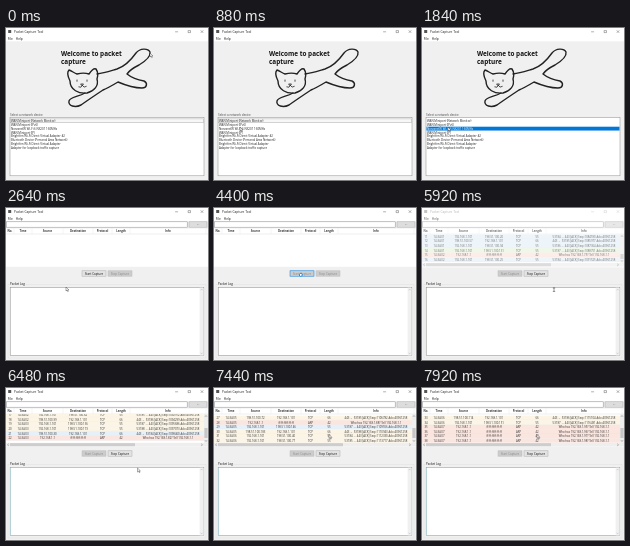
Write an HTML page that moves like this. It is 202x152 px and loops after 8 s.

```html
<!DOCTYPE html>
<html lang="en">
<head>
<meta charset="utf-8">
<title>Packet Capture Tool</title>
<style>
html, body { margin: 0; width: 100%; height: 100%; overflow: hidden; background: #f0f0f0; }
svg { display: block; width: 100vw; height: 100vh; }
text { font-family: "Open Sans", "Noto Sans", sans-serif; white-space: pre; }
</style>
</head>
<body>
<svg id="stage" viewBox="0 0 202 152" preserveAspectRatio="none"></svg>
<script>
const LOOP = 8000, STEP = 80, ROW = 4.6;
const stage = document.getElementById('stage');

const rect = (x, y, w, h, fill, stroke = 'none', sw = .5) =>
  `<rect x="${x}" y="${y}" width="${w}" height="${h}" fill="${fill}" stroke="${stroke}" stroke-width="${sw}"/>`;
const label = (x, y, s, { size = 3.2, fill = '#111', anchor = 'start', weight = 400 } = {}) =>
  `<text x="${x}" y="${y}" font-size="${size}" fill="${fill}" text-anchor="${anchor}" font-weight="${weight}">${s}</text>`;
const line = (d, stroke, sw = .5) =>
  `<path d="${d}" fill="none" stroke="${stroke}" stroke-width="${sw}" stroke-linecap="round" stroke-linejoin="round"/>`;

// Position on a list of [time, x, y] points, eased between neighbours.
function along(points, t) {
  let a = points[0];
  for (const b of points) {
    if (t < b[0]) {
      const p = (t - a[0]) / (b[0] - a[0]), e = p * p * (3 - 2 * p);
      return [a[1] + (b[1] - a[1]) * e, a[2] + (b[2] - a[2]) * e];
    }
    a = b;
  }
  return [a[1], a[2]];
}

const pointer = [
  [0, 144, 25], [480, 62, 104], [720, 30, 112], [880, 26, 99], [2560, 26, 99],
  [2640, 60, 79], [3440, 86, 64.5], [4400, 86, 64.5], [5200, 132, 81],
  [6400, 132, 81], [7200, 115, 46.5]
];

function cursor(t) {
  const [x, y] = along(pointer, t);
  const beam = (t >= 2000 && t < 2640) || (t >= 5280 && t < 6480);
  if (beam) return line(`M${x - .8} ${y - 1}h1.6M${x} ${y - 1}v3.4M${x - .8} ${y + 2.4}h1.6`, '#222', .45);
  const busy = t >= 4400 && t < 5200;
  return (busy ? `<circle cx="${x + .8}" cy="${y + 2.4}" r="1.5" fill="#fff" stroke="#1c86d1" stroke-width=".9"/>` : '') +
    (busy ? '' : `<path d="M${x} ${y}v4l1-.9.7 1.5.6-.3-.7-1.4h1.3z" fill="#fff" stroke="#111" stroke-width=".35"/>`);
}

function frame(t) {
  const ink = t >= 4800 && t < 6000 ? '#999' : '#222';
  return rect(0, 0, 202, 152, '#f0f0f0') + rect(0, 0, 202, 13.3, '#fff') +
    rect(2.2, 2, 3, 3, ink === '#222' ? '#555' : '#aaa') +
    label(8, 4.9, 'Packet Capture Tool', { fill: ink }) +
    line('M169.5 3.8h2.2M182.5 2.6h2v2h-2zM195 2.6l2 2m0-2l-2 2', ink, .35) +
    label(1.8, 11.7, 'File') + label(9.8, 11.7, 'Help');
}

const devices = [
  'WAN Miniport (Network Monitor)', 'WAN Miniport (IPv6)', 'Norvane(R) Wi-Fi 6 NX201 160MHz',
  'WAN Miniport (IP)', 'Brightfen Wi-Fi Direct Virtual Adapter #2',
  'Bluetooth Device (Personal Area Network)', 'Brightfen Wi-Fi Direct Virtual Adapter',
  'Adapter for loopback traffic capture'
];

const cat = line('M91 46C98 45 104 43 111 41C120 38 125 32 130 25C134 20 142 20 144 24C145 29 138 34 133 37' +
    'C127 40 123 43 121 46C126 50 132 52 138 53C142 55 141 60 136 60C128 60 119 57 112 54C107 57 102 60 97 62' +
    'C91 66 82 72 75 77C69 80 62 78 63 73C64 69 72 69 79 65', '#222', 1.4) +
  line('M64 53C61 47 61 44 63 42C66 43 68 45 71 46C75 45 80 45 83 46C85 43 88 40 90 41C92 44 92 48 91 51' +
    'C93 58 88 63 81 65C73 66 64 62 64 53', '#222', 1.4) +
  line('M71 52v1.3M81 52v1.3M75 56h2.5l-1.2 1.4zM76.3 57.5q-1 3-3.5 1.5M76.3 57.5q1.5 3 4 1', '#222', .8);

function deviceScreen(t) {
  const picked = t >= 1840 ? 2 : -1;
  return label(55, 27.8, 'Welcome to packet', { size: 6.4, weight: 700 }) +
    label(55, 36, 'capture', { size: 6.4, weight: 700 }) + cat +
    label(4, 87.6, 'Select a network device', { size: 3, fill: '#444' }) +
    rect(4, 89.5, 194, 58.3, '#fff', '#8c8c8c') +
    (picked < 0 ? rect(4.6, 90.9, 192.8, 3.9, '#f7f7f7', '#999', .4)
      : rect(4.5, 91 + picked * 3.85, 193, 3.85, '#0078d7')) +
    devices.map((s, i) => label(5, 94 + i * 3.85, s, { size: 2.9, fill: i === picked ? '#fff' : '#222' })).join('');
}

const columns = [['No.', 0, 8], ['Time', 8, 18], ['Source', 26, 31], ['Destination', 57, 30],
  ['Protocol', 87, 19], ['Length', 106, 18], ['Info', 124, 76]];
const kinds = 'tttgatyyyytayytyyatyyyyyaaaa';
const tints = { t: '#e5f0f9', g: '#e7f3df', y: '#fcf5e6', a: '#fbe5df' };

function packet(i) {
  const kind = kinds[i], out = i % 3 !== 1;
  const here = '192.168.1.101', there = `198.51.100.${20 + i * 37 % 180}`;
  const time = `14:34:0${Math.min(9, 1 + (i >> 2))}`, port = 53184 + i % 5;
  if (kind === 'a') return [time, '192.168.1.1', 'ff:ff:ff:ff:ff:ff', 'ARP', 42, `Who has 192.168.1.${71 + i}? Tell 192.168.1.1`];
  const ports = out ? `${port} → 443` : `443 → ${port}`;
  return [time, out ? here : there, out ? there : here, 'TCP', out ? 55 : 66,
    `${ports} [ACK] Seq=${1084590 + i * 1387} Ack=40961258`];
}

function packets(t) {
  if (t < 5920) return '';
  const ticks = (from, count) => Math.max(0, Math.min(count, Math.floor((t - from) / STEP) + 1));
  const first = t < 6480 ? 0 : 5 + ticks(6480, 10) + ticks(7440, 7);
  const top = 26.3 + (t < 6480 ? 0 : t < 7440 ? -1.5 : 1.3);
  let rows = '';
  for (let k = 0; k < 6; k++) {
    const i = first + k, y = top + k * ROW, cells = [i + 11, ...packet(i)];
    rows += rect(0, y, 198, ROW, tints[kinds[i]]) + line(`M0 ${y + ROW}H198`, '#d9d9d9', .25);
    cells.forEach((s, c) => {
      const [, x, w] = columns[c];
      rows += label(x + w / 2, y + 3.4, s, { size: 2.8, fill: '#333', anchor: 'middle' });
    });
  }
  return `<svg x="0" y="26" width="198" height="28.8" viewBox="0 26 198 28.8">${rows}</svg>` +
    rect(0, 54.8, 202, 3.8, '#eee') + rect(4, 55.2, 125, 3, '#cdcdcd') +
    line('M2.5 56l-1 .8 1 .8M195.5 56l1 .8-1 .8', '#555', .4) +
    rect(198, 26, 4, 28.8, '#eee') + rect(198.4, t < 6480 ? 46 : 40, 3.2, t < 6480 ? 5 : 10, '#c6c6c6') +
    line('M199.2 28.5l.8-1 .8 1M199.2 52.5l.8 1 .8-1', '#555', .4);
}

function button(x, s, on, hot) {
  return rect(x, 62.8, 24, 5.4, on ? '#e3e3e3' : '#ccc', hot ? '#0078d7' : on ? '#aaa' : '#bbb') +
    label(x + 12, 66.6, s, { anchor: 'middle', fill: on ? '#111' : '#8b8b8b', size: 3 });
}

function captureScreen(t) {
  const live = t >= 5920, hot = t >= 3360 && t < 4800;
  const glow = (t >= 2080 && t < 2640) || t >= 6000;
  const heads = columns.map(([s, x, w]) =>
    label(x + w / 2, 24.4, s, { size: 2.9, weight: 600, anchor: 'middle' }) + line(`M${x + w} 20.6v5`, '#ddd', .3)).join('');
  const wash = t >= 5920 && t < 6000 ? '<rect width="202" height="60" fill="#fff" opacity=".3"/>' : '';
  return rect(.6, 13.8, 180.6, 5.4, '#fff', '#888') + rect(183, 13.8, 18, 5.4, '#ddd', '#aaa') +
    label(192, 17.2, '...', { anchor: 'middle', fill: '#555' }) +
    rect(0, 20, 202, 38.8, '#fff') + line('M0 20H202M0 26H202', '#d4d4d4', .4) + heads + packets(t) +
    button(76, 'Start Capture', t < 4400, hot) + button(102, 'Stop Capture', live, false) +
    rect(2, 76.2, 198, 73.8, 'none', '#dcdcdc', .4) + rect(3.4, 74, 16, 4, '#f0f0f0') +
    label(4, 76.9, 'Packet Log', { size: 3 }) +
    rect(4.2, 79.3, 193.6, 68.4, '#fff', glow ? '#5e9fae' : '#858585') +
    rect(193.6, 79.7, 3.9, 67.7, '#f0f0f0') +
    line('M194.8 82l.8-.9.8.9M194.8 145l.8.9.8-.9', '#aaa', .4) + wash;
}

function draw(time) {
  const t = Math.floor(time % LOOP / STEP) * STEP;
  stage.innerHTML = frame(t) + (t < 2000 ? deviceScreen(t) : captureScreen(t)) + cursor(t);
}

const start = performance.now();
function tick() {
  draw(performance.now() - start);
  requestAnimationFrame(tick);
}
tick();
</script>
</body>
</html>
```
